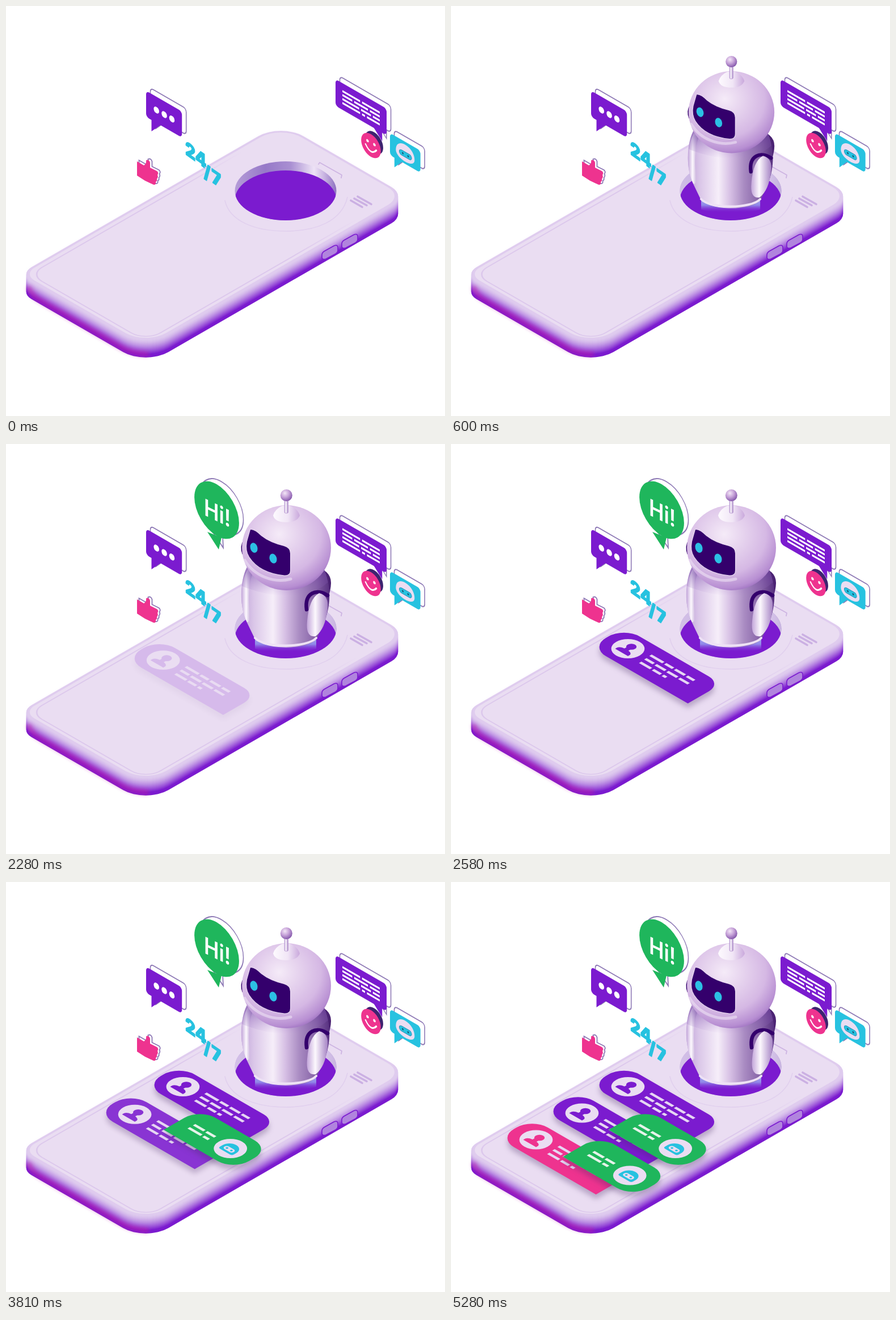
Write an HTML page that moves like this. It is 774 px wide and 723 px high and loops after 5430 ms.

```html
<!DOCTYPE html>
<html lang="en">
<head>
<meta charset="utf-8">
<title>Chat robot</title>
<style>
html, body { margin: 0; width: 100%; height: 100%; overflow: hidden; background: #fff; }
svg { display: block; width: 774px; height: 723px; }
text { font-family: Inter, "Open Sans", sans-serif; }
.line { fill: none; stroke-linecap: round; stroke-linejoin: round; }
.card { filter: drop-shadow(0 8px 5px rgba(70, 40, 100, .3)); }
.back { fill: #fff; stroke: #8d78b5; stroke-width: 1.8; }
</style>
</head>
<body>
<svg viewBox="0 0 774 723">
  <defs>
    <linearGradient id="wall">
      <stop offset="0" stop-color="#b59cd8"/><stop offset=".3" stop-color="#9679c8"/>
      <stop offset=".55" stop-color="#a98fd2"/><stop offset=".78" stop-color="#eee3f6"/>
      <stop offset=".88" stop-color="#c9b4e2"/><stop offset="1" stop-color="#8d70c0"/>
    </linearGradient>
    <linearGradient id="frame" gradientUnits="userSpaceOnUse" x1="0" y1="90" x2="0" y2="220">
      <stop offset="0" stop-color="#dcc8ec" stop-opacity="0"/><stop offset="1" stop-color="#dcc8ec"/>
    </linearGradient>
    <radialGradient id="head" cx=".42" cy=".34" r=".72">
      <stop offset="0" stop-color="#f5ebf8"/><stop offset=".3" stop-color="#e6d3ee"/>
      <stop offset=".65" stop-color="#d5b8e4"/><stop offset=".88" stop-color="#b78ed2"/>
      <stop offset="1" stop-color="#9264b8"/>
    </radialGradient>
    <linearGradient id="body">
      <stop offset="0" stop-color="#bfa2d8"/><stop offset=".14" stop-color="#dac6e8"/>
      <stop offset=".36" stop-color="#f6eef9"/><stop offset=".5" stop-color="#d6bfe4"/>
      <stop offset=".66" stop-color="#a98bc2"/><stop offset=".85" stop-color="#8461a5"/>
      <stop offset="1" stop-color="#573080"/>
    </linearGradient>
    <linearGradient id="base" x1="0" y1="0" x2="0" y2="1">
      <stop offset="0" stop-color="#a9b4f2"/><stop offset=".55" stop-color="#9088e8"/>
      <stop offset="1" stop-color="#7b1bcf" stop-opacity="0"/>
    </linearGradient>
    <linearGradient id="neck" x1="0" y1="0" x2="0" y2="1">
      <stop offset=".4" stop-color="#6d3fa0" stop-opacity=".75"/><stop offset="1" stop-color="#a880cc" stop-opacity="0"/>
    </linearGradient>
    <linearGradient id="arm">
      <stop offset="0" stop-color="#c3a6da"/><stop offset=".4" stop-color="#fcf8fd"/>
      <stop offset="1" stop-color="#a583c4"/>
    </linearGradient>
    <linearGradient id="cap">
      <stop offset="0" stop-color="#fdfafe"/><stop offset=".55" stop-color="#f1e6f6"/>
      <stop offset="1" stop-color="#c9a8dc"/>
    </linearGradient>
    <radialGradient id="ball" cx=".38" cy=".32" r=".7">
      <stop offset="0" stop-color="#f3e6f7"/><stop offset=".5" stop-color="#c6a2d8"/>
      <stop offset="1" stop-color="#8457ab"/>
    </radialGradient>
    <clipPath id="hole"><ellipse cx="493" cy="326" rx="89.5" ry="52"/></clipPath>
    <path id="torso" d="M426 215C412 240 411 285 424 313L438 342C453 364 533 364 548 343L562 312C574 280 573 245 558 215Z"/>
    <clipPath id="inside"><use href="#torso"/></clipPath>
    <path id="hand" d="M231 274L243 281Q248 278 247 272 252 270 254 276V285L266 291Q270 294 267 298 269 302 266 305 267 309 264 310 265 316 260 315L245 308 231 299Z"/>
    <filter id="soft"><feGaussianBlur stdDeviation="3"/></filter>
  </defs>

  <g id="phone"></g>
  <path class="line" d="M41 498Q45 511 60 519L205 603Q224 613 248 614" stroke="#c01fa8" stroke-width="9" opacity=".5" filter="url(#soft)"/>

  <!-- phone details -->
  <path class="line" d="M386 343C394 380 440 397 493 397S592 380 602 337" stroke="#e1d0ee" stroke-width="1.6"/>
  <path class="line" d="M551 279L553 276 592 298 591 303" stroke="#cdb4e2" stroke-width="1.8"/>
  <path class="line" d="M608 343L628 354.500M614 339.500L636 351.500M620 336L644 349.500" stroke="#cbb0e3" stroke-width="3.6"/>
  <g fill="#b184de" stroke="#7b1bcf" stroke-width="1.6">
    <path id="key" d="M557 439Q557 435 561 432.500L578 423Q585 420 585 426V431Q585 434 581 437L564 446Q557 448 557 443Z"/>
    <use href="#key" x="35" y="-19.500"/>
  </g>
  <ellipse cx="493" cy="326" rx="89.500" ry="52" fill="url(#wall)"/>
  <ellipse id="glow" cx="493" cy="326" rx="89.500" ry="52" fill="#dccbed"/>
  <ellipse cx="493" cy="342" rx="89.500" ry="52" fill="#7b1bcf" clip-path="url(#hole)"/>

  <g id="chat"></g>

  <!-- robot -->
  <g id="robot">
    <path d="M439 336V361C460 369 528 369 547 361V336Z" fill="url(#base)"/>
    <path d="M540 215Q574 222 573 246 572 268 560 282L530 270Z" fill="#4b2373"/>
    <use href="#torso" fill="url(#body)"/>
    <path d="M426 222C411 245 412 290 425 314 432 316 429 300 428 280 427 255 432 235 436 224Z" fill="url(#arm)"/>
    <path class="line" d="M439 342C455 360 531 360 547 342" stroke="#eee2f5" stroke-width="4"/>
    <path d="M410 200V248Q450 266 493 268 545 270 576 236V200Z" fill="url(#neck)" opacity=".6" clip-path="url(#inside)"/>
    <path class="line" d="M530 292C526 262 548 254 567 267" stroke="#34006c" stroke-width="6.500"/>
    <path d="M552 263Q570 267 567 291 563 326 546 339 528 342 531 312 534 273 552 263Z" fill="url(#arm)"/>
    <path d="M420 170Q413 181 418 194Z" fill="#34006c" stroke="#34006c" stroke-width="3"/>
    <ellipse cx="494.500" cy="183" rx="78.500" ry="75" fill="url(#head)"/>
    <path class="line" d="M421 205C438 233 472 246 502 238" stroke="#f6eef9" stroke-width="5" opacity=".5"/>
    <path d="M431 151Q438 150 450 162 465 174 490 180 501 183 501 193V223Q501 232 491 231.500 447 227 429 199 422 188 425 172Z" fill="#34006c" stroke="#e9daf1" stroke-width="2" paint-order="stroke"/>
    <ellipse cx="437" cy="183" rx="6.300" ry="9" fill="#2cc0e4" transform="rotate(-18 437 183)"/>
    <ellipse cx="471" cy="202" rx="6.300" ry="8.800" fill="#2cc0e4" transform="rotate(-18 471 202)"/>
    <path d="M471 126Q474 115 487 109H501Q515 115 518 126 514 138 494 138T471 126Z" fill="url(#cap)"/>
    <rect x="491" y="97" width="6.500" height="25" rx="2" fill="url(#arm)" stroke="#b495cf" stroke-width=".8"/>
    <circle cx="494.300" cy="90.500" r="10.500" fill="url(#ball)"/>
  </g>

  <!-- greeting -->
  <g id="hi">
    <path class="back" d="M363 153L383 183 382 162Z"/>
    <circle class="back" r="44.500" transform="matrix(.866 .5 0 1 380 111)"/>
    <path d="M355 155L375 186 380 165Z" fill="#1fb65c"/>
    <circle r="45.500" transform="matrix(.866 .5 0 1 371.500 116.500)" fill="#1fb65c"/>
    <text transform="matrix(.866 .42 0 1 349 125)" font-size="41" font-weight="600" fill="#fff">Hi!</text>
  </g>

  <!-- floating icons -->
  <g id="icons"></g>
  <g font-size="33" font-weight="800" fill="#27c2e0" stroke="#27c2e0" stroke-width="1.8" stroke-linejoin="round">
    <text transform="matrix(.866 .62 0 1 316 261)">24</text>
    <text transform="matrix(.866 .6 0 1 349 301)" letter-spacing="2">/7</text>
  </g>
  <use href="#hand" class="back" x="3.500" y="-2"/>
  <use href="#hand" fill="#ee338f"/>
  <circle r="18.500" transform="matrix(.866 .5 0 1 649 241)" fill="#3d2470"/>
  <g transform="matrix(.866 .5 0 1 643.500 246)">
    <circle r="20" fill="#ee338f"/>
    <circle cx="-7" cy="-5" r="2.600" fill="#fff"/><circle cx="7" cy="-5" r="2.600" fill="#fff"/>
    <path class="line" d="M-11 3Q0 18 11 3" stroke="#fff" stroke-width="2.800"/>
  </g>
</svg>
<script>
const LOOP = 5430, STEP = 30;
const PURPLE = '#7b1bcf', GREEN = '#1fb65c', PINK = '#ee338f', CYAN = '#27c2e0', PALE = '#eaddf2';
const $ = id => document.getElementById(id);
const flat = (x, y) => `matrix(.866 .5 -.866 .5 ${x} ${y})`;
const wall = (x, y) => `matrix(.866 .5 0 1 ${x} ${y})`;

// Rounded rectangle; radii run clockwise from top left.
function box(x, y, w, h, [a, b, c, d]) {
  const arc = (r, dx, dy) => `a${r} ${r} 0 0 1 ${dx} ${dy}`;
  return `M${x + a} ${y}h${w - a - b}${arc(b, b, b)}v${h - b - c}${arc(c, -c, c)}` +
    `h${c + d - w}${arc(d, -d, -d)}v${a + d - h}${arc(a, a, -a)}z`;
}

function mix(from, to, k) {
  return `rgb(${from.map((v, i) => Math.round(v + (to[i] - v) * k))})`;
}

// Phone: stacked slices shade the rounded side.
const DEPTH = 31, shell = box(0, 0, 258, 533, [46, 33, 46, 25]);
let slices = '';
for (let i = DEPTH; i >= 0; i--) {
  const k = Math.min(1, i / 26) ** 1.4;
  slices += `<path d="${shell}" transform="${flat(484.6, 206.7 + i)}" fill="${mix([222, 202, 238], [123, 27, 207], k)}"/>`;
}
$('phone').innerHTML = slices + `<g transform="${flat(484.6, 206.7)}">
  <path d="${box(3, 3, 250, 525, [44, 31, 44, 23])}" fill="#e1cfef" filter="url(#soft)"/>
  <path d="${box(4, 4, 249, 524, [42, 30, 42, 22])}" fill="${PALE}"/>
  <path d="${box(11, 11, 236, 511, [30, 24, 30, 24])}" fill="none" stroke="url(#frame)" stroke-width="2.2"/></g>`;

// Rows of dashes: [y, start, end, start, end, ...]
const dashes = rows => rows.map(([y, ...xs]) =>
  xs.map((x, i) => (i % 2 ? 'H' : 'M') + x + (i % 2 ? '' : ' ' + y)).join('')).join('');

const face = (main, eyes) => `<path d="M-14 7V2A14 14 0 0 1 14 2V7Q14 11 10 11H-10Q-14 11 -14 7Z" fill="${main}"/>
  <rect x="-9.500" y="-2" width="19" height="9" rx="4.500" fill="${eyes}"/>
  <circle cx="-4.500" cy="2.500" r="2" fill="${main}"/><circle cx="4.500" cy="2.500" r="2" fill="${main}"/>`;

const person = color => `<circle cy="-7" r="7.500" fill="${color}"/>
  <path d="M-13 13V9Q-12 4 -4 3V-2H4V3Q12 4 13 9V13Z" fill="${color}"/>`;

function userCard(color) {
  return `<path d="${box(0, 0, 199, 69, [32, 26, 0, 32])}" fill="${color}"/>
    <g transform="translate(41.500 33.500)"><circle r="24" fill="${PALE}"/>${person(color)}</g>
    <path d="${dashes([[22, 76, 102, 106, 122, 126, 146, 150, 165], [33.5, 77, 94, 98, 118, 122, 142, 146, 165], [45, 78, 100, 104, 120, 124, 131]])}" stroke="#e6d6f3" stroke-width="5"/>`;
}

function botCard() {
  return `<path d="${box(0, 0, 142, 74, [32, 30, 32, 0])}" fill="${GREEN}"/>
    <g transform="translate(101 39)"><circle r="24" fill="${PALE}"/>${face(CYAN, PALE)}</g>
    <path d="${dashes([[34, 22, 43, 47, 65], [45, 22, 48, 52, 63]])}" stroke="#e6f3ea" stroke-width="5"/>`;
}

// Painted back to front: start time, slide distance, place, content.
const cards = [
  [2250, 42, 305, 323.5, userCard(PURPLE)],
  [3600, 29, 224, 370, userCard(PURPLE)],
  [4950, 22, 143, 417, userCard(PINK)],
  [2700, 28, 342, 400, botCard()],
  [4050, 27, 261.5, 447.5, botCard()],
].map(([start, slide, x, y, art]) => {
  const el = document.createElementNS('http://www.w3.org/2000/svg', 'g');
  el.setAttribute('class', 'card');
  el.innerHTML = `<g transform="${flat(x, y)}">${art}</g>`;
  $('chat').append(el);
  return { el, start, slide };
});

// Upright speech bubble with a white copy behind it.
function bubble(x, y, w, h, color, tail, art) {
  const d = box(0, 0, w, h, [6, 6, 6, 6]);
  const shape = (dx, dy, attrs) => `<g transform="${wall(x + dx, y + dy)}" ${attrs}><path d="${tail}"/><path d="${d}"/></g>`;
  return shape(7.5, -5, 'class="back"') + shape(0, 0, `fill="${color}"`) +
    `<g transform="${wall(x, y)}">${art}</g>`;
}

$('icons').innerHTML =
  bubble(247, 149.5, 73, 46, PURPLE, 'M11 43V66L32 43Z',
    [21, 37, 52.5].map(x => `<circle cx="${x}" cy="23.500" r="5.500" fill="#fff"/>`).join('')) +
  bubble(581, 129, 104, 47, PURPLE, 'M76 45L95 62V45Z',
    `<path d="${dashes([[14, 14, 50, 54, 90], [21, 14, 34, 38, 66, 70, 90], [28, 14, 48, 52, 72, 76, 90], [35, 14, 50, 54, 60, 64, 90]])}" stroke="#fff" stroke-width="3.600"/>`) +
  bubble(677, 224, 62, 39, CYAN, 'M9 36V56L27 36Z',
    `<g transform="translate(31 20)">
     <path d="M-19 3C-19 -21 19 -21 19 3 19 19 -19 19 -19 3Z" fill="${PALE}"/>
     <rect x="-12" y="-2" width="25" height="9" rx="4.500" fill="${CYAN}" stroke="#1a8fb5"/>
     <circle cx="-5" cy="2.500" r="1.800" fill="#14607f"/><circle cx="6" cy="2.500" r="1.800" fill="#14607f"/></g>`);

function ease(t, start, length, power) {
  const k = Math.min(1, Math.max(0, (t - start) / length));
  return 1 - (1 - k) ** power;
}

// Grows from half size around a fixed point while fading in.
function grow(el, p, x, y) {
  const s = .5 + p / 2;
  el.setAttribute('transform', `translate(${x} ${y}) scale(${s}) translate(${-x} ${-y})`);
  el.style.opacity = Math.min(1, p * 1.1);
}

function draw(now) {
  const t = Math.floor(now % LOOP / STEP) * STEP;
  const rise = ease(t, 150, 630, 2.1);
  grow($('robot'), rise, 494, 300);
  $('glow').style.opacity = rise * .75;
  grow($('hi'), ease(t, 900, 630, 2.7), 375.5, 255);
  for (const { el, start, slide } of cards) {
    const p = ease(t, start, 330, 2), d = slide * (1 - p);
    el.setAttribute('transform', `translate(${-d} ${d * .58})`);
    el.style.opacity = p;
  }
}

const begin = performance.now();
function tick() {
  draw(performance.now() - begin);
  requestAnimationFrame(tick);
}
tick();
</script>
</body>
</html>
```
